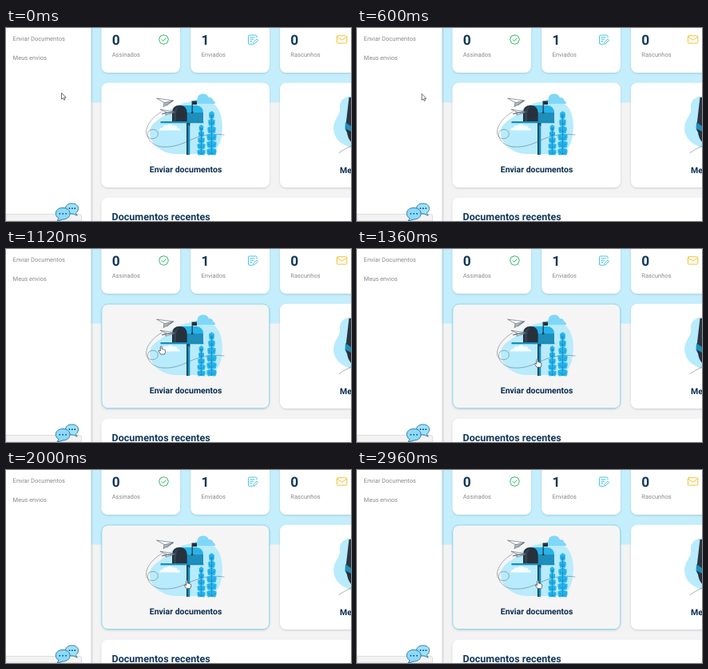
Animation of 432x242 px, one loop 3 s. Source, as an HTML page:

```html
<!DOCTYPE html>
<html lang="pt">
<head>
<meta charset="utf-8">
<title>Documentos</title>
<style>
html, body { margin: 0; width: 100%; height: 100%; overflow: hidden; background: #f3f3f3; }
svg { display: block; width: 100%; height: 100%; }
text { font-family: Roboto, Inter, sans-serif; text-rendering: geometricPrecision; }
.small { font-size: 7.55px; fill: #868a8f; }
.bold { font-weight: 700; fill: #12385c; }
.num { font-size: 17.3px; }
.title { font-size: 10.5px; text-anchor: middle; fill: #0b2d52; }
.ink { fill: none; stroke: #3a4954; stroke-width: .55; stroke-linejoin: round; stroke-linecap: round; }
.thin { stroke: #53656f; stroke-width: .5; }
.icon { fill: none; stroke-width: 1; stroke-linejoin: round; stroke-linecap: round; }
</style>
</head>
<body>
<svg viewBox="0 0 432 242" preserveAspectRatio="none">
  <defs>
    <filter id="soft" x="-10%" y="-10%" width="120%" height="125%">
      <feDropShadow dx="0" dy="1" stdDeviation="1.1" flood-color="#31566b" flood-opacity=".24"/>
    </filter>
    <linearGradient id="edge">
      <stop offset="0" stop-color="#52636d" stop-opacity=".28"/>
      <stop offset="1" stop-color="#52636d" stop-opacity="0"/>
    </linearGradient>
  </defs>

  <rect width="432" height="242" fill="#f3f3f3"/>
  <rect width="432" height="93.5" fill="#c5eefc"/>
  <rect x="106" width="3.5" height="242" fill="url(#edge)"/>
  <rect width="106.5" height="242" fill="#fff"/>
  <text class="small" x="8.6" y="16.3">Enviar Documentos</text>
  <text class="small" x="8.6" y="40.3">Meus envios</text>
  <path d="M0 233.5H92Q94.5 233.5 94.5 236V242H0Z" fill="#f3f3f3" stroke="#d3d6d7" stroke-width=".8"/>

  <g id="cards" fill="#fff" filter="url(#soft)"></g>
  <rect id="hover" x="119.8" y="69" width="210" height="130.7" rx="8" fill="#f5f5f5" stroke="#86d5ea" stroke-width="1"/>
  <g id="stats"></g>

  <g class="icon" stroke="#28b463">
    <path d="M197.5 8.7l2 .8 2.2.5.7 2 1 2.4-1 2.3-.8 2.2-2.1.6-2 .9-2-.9-2.2-.6-.7-2.2-1-2.3 1-2.4.7-2 2.2-.5z"/>
    <path d="M195 14.6l1.8 1.8 3.4-3.6"/>
  </g>
  <g class="icon" stroke="#45c2e6">
    <path d="M314 12V10.3Q314 9 312.7 9H304.8Q303.5 9 303.5 10.3V19Q303.5 20.3 304.8 20.3H308.5"/>
    <path d="M305.8 11.8h5.4M305.8 14.2h3.8M305.8 16.6h2"/>
    <path d="M309.8 19.8l.5-2.2 3.6-3.6 1.5 1.6-3.6 3.6z"/>
  </g>
  <g class="icon" stroke="#f2c230">
    <rect x="414.4" y="9.7" width="12.4" height="9.4" rx="1.2"/>
    <path d="M414.8 11.2l5.8 4 5.8-4"/>
  </g>

  <g id="mailbox">
    <path fill="#b8ebfc" d="M180 130C181 118 193 115 201 107C209 99 216 95 228 93C240 88 256 89 264 99C271 108 272 122 270 135C268 148 262 156 252 158H212C198 158 179 147 180 130Z"/>
    <path fill="#7fd7f8" d="M235.5 95Q235 90.5 239.5 89.8Q239.7 83 246 82.5Q252 82 254 87.3Q258.8 86.5 259.3 91Q262 91.5 262 95Z"/>
    <path fill="#f4fcff" d="M192 128.5Q192 125 196 125Q197.5 121 201.5 122.3Q205.5 118 209.5 122.5Q214 121.5 214.5 125.3Q218 125.2 218 128.5Z"/>
    <path class="ink thin" d="M195 105C184 111 176 121 175.5 130C175 140 187 141 190 135C192 128 184 125 179 129C174 135 181 148 196 149C211 150 221 145 234 139C247 134 259 132 273 134"/>
    <g id="trees"></g>
    <path fill="#1b8fbd" d="M226 119h4.3v40h-4.3z"/>
    <path fill="#173f5b" d="M226 119h1.6v40h-1.6zM226 119h4.3v4z"/>
    <path fill="#27b3e8" d="M216 97H238Q247 97.5 247 106.5V118H226V106Q225 98 216 97Z"/>
    <path fill="#1e8ebb" d="M227 106H247V118.5H227Z"/>
    <path fill="#26313d" d="M208 118V106.5Q208 97 217.3 97T226.8 106.5V118Z"/>
    <path fill="#34434f" d="M210 117V107Q210 99 217.3 99Q213 102 213 109V117Z"/>
    <path fill="#178db9" d="M193.5 117H247.3V119.3H193.5Z"/>
    <path fill="#26313d" d="M232.6 91.5H239V96H233.8V106H232.6Z"/>
    <circle cx="233.2" cy="106" r="1.3" fill="#26313d"/>
    <g class="ink" style="fill:#fff">
      <path d="M189 88.2L209.5 91L201.5 97.2L198.3 93.7Z"/>
      <path d="M198.3 93.7L209.5 91L197.5 98.5Z" fill="#aebbc3"/>
      <path d="M193.5 102.2L213 105.3L200 109.2L200.5 105.8Z"/>
      <path d="M200.5 105.8L213 105.3L195.5 107.8Z" fill="#aebbc3"/>
    </g>
  </g>

  <g id="folder">
    <path fill="#b8ebfc" d="M432 85C421 87 417 93 418 101C419 109 411 113 410 125C410 138 419 146 432 150Z"/>
    <path fill="#2a3541" d="M429.5 87H432V131L425 126Z"/>
    <path fill="#1e8ebb" d="M425 118L432 123V130L424.5 126Z"/>
    <path fill="#26313d" d="M424.5 126L432 130V143Q428 138 427 131Z"/>
    <path class="ink thin" d="M417 156.5Q423 152 432 148"/>
  </g>

  <text class="bold title" x="225" y="181.3">Enviar documentos</text>
  <text class="bold title" x="448" y="181.8">Meus envios</text>
  <text class="bold" x="132.5" y="240.6" font-size="12.55">Documentos recentes</text>

  <g stroke="#2a6e9c" stroke-width=".9" stroke-linejoin="round">
    <path fill="#9be2fc" d="M82.5 220C87.5 220 90.5 222.6 90.5 226.3C90.5 229 89 231 87.3 232L89.2 235.2L84 233C78 233.5 74.5 230.5 74.5 226.5C74.5 222.5 77.5 220 82.5 220Z"/>
    <path fill="#8bdafb" d="M71 225.5C76.5 225.5 80 228.6 80 232.7C80 237 76.5 240 71 240L64 242.2L66 238.5C63.5 237 62.3 235 62.3 232.7C62.3 228.5 65.5 225.5 71 225.5Z"/>
  </g>
  <g fill="#123f63" id="dots"></g>

  <path id="arrow" d="M0 0V8L1.9 6.4L3.1 9L4.5 8.4L3.3 5.9H5.6Z" fill="#fff" stroke="#333" stroke-width=".7" stroke-linejoin="round"/>
  <path id="hand" d="M-.9 .8Q0 -.6 .9 .8V3.6Q1.9 3 2.5 4Q3.5 3.5 4 4.6Q5.2 4.4 5.2 5.8V7.4Q5 9 4.2 10.2H-.5Q-1.7 8.3 -3.1 6.4Q-3 4.9 -1.7 5.5L-.9 6.3Z" fill="#fff" stroke="#333" stroke-width=".7" stroke-linejoin="round"/>
</svg>
<script>
const el = id => document.getElementById(id);
const LOOP = 3000, STEP = 40;

const card = (x, y, w, h) => `<rect x="${x}" y="${y}" width="${w}" height="${h}" rx="8"/>`;
el('cards').innerHTML = [
  [119.5, -30, 98.5, 86], [231.3, -30, 98.7, 86], [343, -30, 98.5, 86],
  [119.5, 68.7, 210.5, 131.3], [343, 68.7, 210.5, 131.3], [119.5, 212.7, 434, 60]
].map(c => card(...c)).join('');

el('stats').innerHTML = [['0', 'Assinados'], ['1', 'Enviados'], ['0', 'Rascunhos']]
  .map(([n, label], i) => {
    const x = 132.7 + i * 111.8;
    return `<text class="bold num" x="${x}" y="20.8">${n}</text>
      <text class="small" x="${x}" y="35.6">${label}</text>`;
  }).join('');

// A tree is a solid tapering column edged with pairs of upward leaves.
function tree(x, top, half, rows) {
  const gap = (159 - top) / rows;
  let leaves = '', veins = `M${x} ${top + 4}V159`;
  for (let i = 0; i < rows; i++) {
    const y = top + i * gap, w = half * Math.min(1, .55 + i * .15);
    for (const s of [-1, 1]) {
      const tip = x + s * w;
      leaves += `M${x} ${y}Q${x + s * w * .6} ${y + gap * .2} ${tip} ${y + gap * .25}
        Q${tip + s * .4} ${y + gap * .8} ${x + s * w * .75} ${y + gap * 1.05}L${x} ${y + gap}Z`;
      veins += `M${x} ${y + gap * .95}L${x + s * w * .7} ${y + gap * .5}`;
    }
  }
  return `<path fill="#25b5ee" d="${leaves}"/>
    <path fill="none" stroke="#187fad" stroke-width=".6" d="${veins}"/>`;
}
el('trees').innerHTML = tree(244.5, 121, 5, 5) + tree(257.5, 104, 6, 6);

el('dots').innerHTML = [[67.3, 232.8], [71.2, 232.8], [75.1, 232.8], [79.5, 226.2], [82.9, 226.2], [86.3, 226.2]]
  .map(([x, y]) => `<circle cx="${x}" cy="${y}" r=".9"/>`).join('');

function draw(ms) {
  const t = Math.floor(ms / STEP) * STEP;
  const u = Math.min(1, Math.max(0, (t - 440) / 960));
  const p = u * u * (3 - 2 * u);
  const x = 69.5 + 157 * p, y = 81.3 + 57.2 * p ** 1.5;
  const over = x > 119.5;
  el('hover').style.opacity = over ? 1 : 0;
  el('arrow').style.display = over ? 'none' : '';
  el('hand').style.display = over ? '' : 'none';
  el(over ? 'hand' : 'arrow').setAttribute('transform', `translate(${x} ${y})`);
}

const start = performance.now();
function tick() {
  draw((performance.now() - start) % LOOP);
  requestAnimationFrame(tick);
}
draw(0);
requestAnimationFrame(tick);
</script>
</body>
</html>
```
